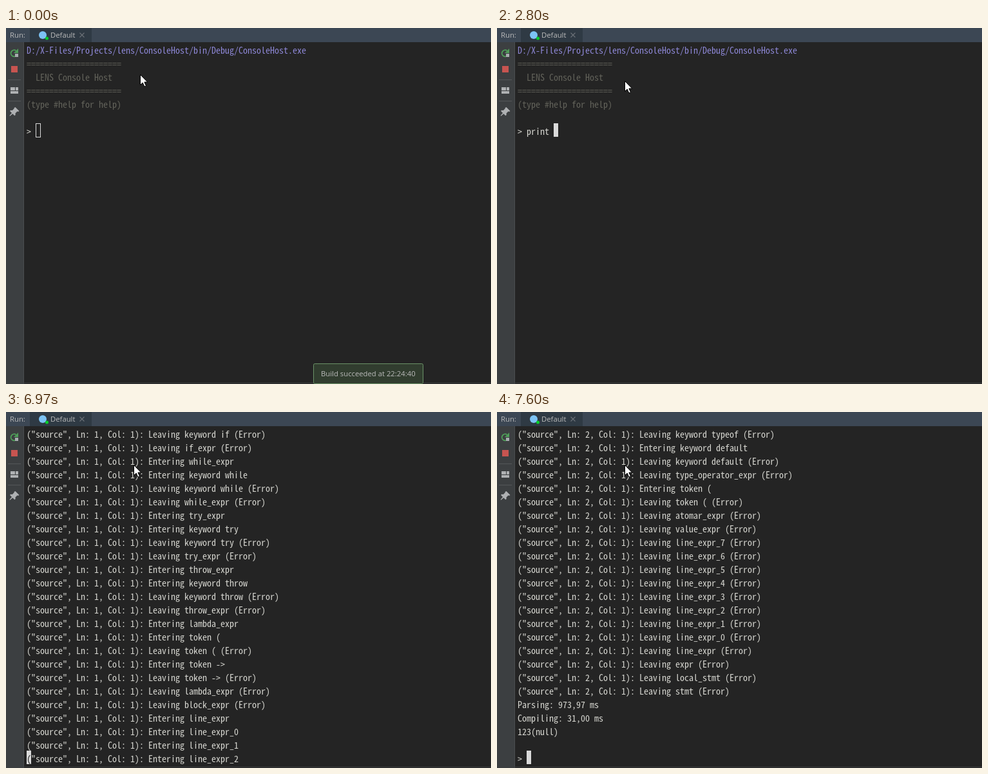
An HTML page with a canvas for the animation above (8 s loop, 753 px wide and 553 px high).

```html
<!DOCTYPE html>
<html>
<head>
<meta charset="utf-8">
<style>
html, body { margin: 0; width: 100%; height: 100%; overflow: hidden; background: #242424; }
canvas { display: block; }
</style>
</head>
<body>
<canvas id="stage" width="753" height="553"></canvas>
<script>
const ctx = document.getElementById('stage').getContext('2d', { alpha: false });
const LOOP = 8000, LEFT = 32, TOP = 22, CELL = 7, ROW = 21, ROWS = 25;
const TEXT = '#d6d6d0', BG = '#242424', BLOCK = '#dadada';
const UI = '11.3px "Open Sans", sans-serif';
const MONO = '"Noto Sans Mono CJK JP", "Noto Sans Mono CJK SC", "Noto Sans Mono", monospace';

// Pick the font size whose advance is one cell.
ctx.font = `14px ${MONO}`;
const mono = `${14 * CELL / ctx.measureText('M').width}px ${MONO}`;

// Trace shorthand: @line:col, + entering, - failed, = succeeded, ~ entered and failed.
function trace(script) {
  let at = '';
  return script.split('|').flatMap(item => {
    const name = item.slice(1);
    const enter = `("source", ${at}): Entering ${name}`;
    const leave = `("source", ${at}): Leaving ${name}`;
    switch (item[0]) {
      case '@': {
        const [line, col] = name.split(':');
        at = `Ln: ${line}, Col: ${col}`;
        return [];
      }
      case '+': return [enter];
      case '-': return [leave + ' (Error)'];
      case '=': return [leave + ' (Ok)'];
      case '~': return [enter, leave + ' (Error)'];
      default: return [item];
    }
  });
}
const tries = (kind, words) => words.split(' ').map(w => `~${kind} ${w}`).join('|');
const levels = (sign, list) => [...list].map(n => `${sign}line_expr_${n}`).join('|');
const skip = 'Inside skipNewlines with fresh = false';
const next = '+nextLine > checkIndent|=nextLine > checkIndent|' + skip;
const indent = '+ensureIndent 0|=ensureIndent 0|=indented line';
const definitions = '+using|~keyword using|-using|+record_def|~keyword record|-record_def|' +
  '+type_def|~keyword type|-type_def|+fun_def|~keyword pure|~keyword fun|-fun_def|+local_stmt|' +
  '+name_def_stmt|+var_stmt|~keyword var|-var_stmt|+let_stmt|~keyword let|-let_stmt|-name_def_stmt|' +
  '+assignment_stmt|~token ref|-assignment_stmt|+expr|+block_expr';
const values = '+value_expr|+atomar_expr|+literal|' +
  tries('keyword', 'null true false') + '|-literal|+type_operator_expr|' +
  tries('keyword', 'typeof default');

const parts = [
  `@1:1|+stmt|${definitions}|+if_expr|~keyword if|-if_expr|` +
  ['while', 'try', 'throw'].map(w => `+${w}_expr|~keyword ${w}|-${w}_expr`).join('|') +
  `|+lambda_expr|~token (|~token ->|-lambda_expr|-block_expr|+line_expr|${levels('+', '012')}`,

  `@1:1|${levels('+', '34567')}|${values}|-type_operator_expr|~token (|-atomar_expr|-value_expr|` +
  `${levels('-', '76543210')}|-line_expr|+invoke_expr|=identifier|@1:7|+value_expr|+literal|=literal|` +
  `=value_expr|@1:11|${tries('token', '[ . ** * / % + -')}|=line_expr_3|` +
  `${tries('token', '== <> < > <= >=')}|=line_expr_2|${tries('token', '&& || ^^'.replace('||', 'or'))}|` +
  `=line_expr_1|${tries('keyword', 'as is')}|=line_expr_0|+indented block|+indent level increase|` +
  `+indented line|${next}|@2:1|${indent}|-indent level increase|-indented block|@1:11|=line_expr|` +
  `=expr|=local_stmt|+indented line|${next}|@2:1|${indent}`,

  `@2:1|=stmt|+stmt|${definitions}|~keyword if|~keyword while|~keyword try|~keyword throw|-block_expr|` +
  `+line_expr|${levels('+', '01234567')}|${values}|-type_operator_expr|~token (|-atomar_expr|-value_expr|` +
  `${levels('-', '76543210')}|-line_expr|-expr|-local_stmt|-stmt|` +
  'Parsing: 973,97 ms|Compiling: 31,00 ms|123(null)| |> '
].map(trace);
const log = parts.flat();
const firstEnd = parts[0].length, secondEnd = firstEnd + parts[1].length;

const steps = [6890, 6970, 7030, 7100, 7170, 7240, 7300, 7370, 7440, 7520, 7600];
const typed = [[0, ''], [1950, 'p'], [2110, 'pr'], [2300, 'pri'], [2450, 'prin'], [2800, 'print '],
  [3360, 'print 1'], [3440, 'print 123'], [4100, 'print 123 '], [4560, 'print 123 #']];

function rect(x, y, w, h, color) {
  ctx.fillStyle = color;
  ctx.fillRect(x, y, w, h);
}
function label(text, x, y, color = '#bbbbbb') {
  ctx.font = UI;
  ctx.fillStyle = color;
  ctx.fillText(text, x, y);
}
function write(text, row, color = TEXT, col = 0) {
  ctx.font = mono;
  ctx.fillStyle = color;
  ctx.fillText(text, LEFT + col * CELL, TOP + 18 + row * ROW);
}
function stroke(path, color, width) {
  ctx.strokeStyle = color;
  ctx.lineWidth = width;
  ctx.stroke(new Path2D(path));
}
function fill(path, color) {
  ctx.fillStyle = color;
  ctx.fill(new Path2D(path));
}
function dot(x, y, r, color) {
  ctx.beginPath();
  ctx.arc(x, y, r, 0, 7);
  ctx.fillStyle = color;
  ctx.fill();
}
function block(col, row, char = '') {
  rect(LEFT + col * CELL, TOP + row * ROW, CELL, ROW, BLOCK);
  write(char, row, BG, col);
}

function drawWindow() {
  rect(0, 0, 753, 553, BG);
  rect(0, 0, 753, 22, '#3c4754');
  rect(37, 0, 96, 22, '#2f3a44');
  rect(0, 22, 28, 531, '#3c3f41');
  rect(27, 22, 1, 531, '#4b4d4f');
  rect(0, 551, 753, 1, '#3c3f41');
  label('Run:', 6, 15);
  dot(57, 11, 6, '#7cc3f4');
  dot(63.5, 16, 2.5, '#08d02c');
  label('Default', 69, 15);
  stroke('M114.5 7.5l7 7m0-7l-7 7', '#6c7278', 1.1);

  stroke('M16.5 42.5A5 5 0 1 1 15.5 35.2', '#4f9d59', 2);
  fill('M19 32v7h-7z', '#4f9d59');
  rect(14, 40, 5, 5, '#a9adb0');
  rect(8, 59, 10, 10, '#c75450');
  rect(3, 80, 20, 1, '#555759');
  rect(7, 92, 7, 5, '#afb1b3');
  rect(15, 92, 4, 5, '#afb1b3');
  rect(7, 98, 12, 4, '#afb1b3');
  rect(3, 113, 20, 1, '#555759');
  fill('M14.5 123l6 6-1.5 1-1.5-.5-3 3 .2 2.5-1.4 1.2-3-3-4 3.5-.8-.8 3.5-4-3-3 1.2-1.2 2.6.2 3-3-.3-1z', '#afb1b3');
}

function drawNotice(alpha) {
  if (alpha <= 0) return;
  ctx.globalAlpha = alpha;
  ctx.beginPath();
  ctx.roundRect(477.5, 521.5, 170, 31, 2);
  ctx.fillStyle = '#313d2f';
  ctx.fill();
  ctx.strokeStyle = '#6b9268';
  ctx.lineWidth = 1;
  ctx.stroke();
  label('Build succeeded at 22:24:40', 489, 541);
  ctx.globalAlpha = 1;
}

function drawPrompt(t) {
  write('D:/X-Files/Projects/lens/ConsoleHost/bin/Debug/ConsoleHost.exe', 0, '#8c86d4');
  ['='.repeat(21), '  LENS Console Host', '='.repeat(21), '(type #help for help)']
    .forEach((line, i) => write(line, i + 1, '#62625a'));
  const input = typed.findLast(([start]) => t >= start)[1];
  write('> ' + input, 6);
  if (t < 990) {
    ctx.strokeStyle = BLOCK;
    ctx.lineWidth = 1;
    ctx.strokeRect(46.5, 148.5, 7, 21);
  } else if (t >= 6610) {
    block(0, 8);
  } else if (!(t >= 3940 && t < 4100 || t >= 5560 && t < 6080)) {
    block(2 + input.length, 6);
  }
}

function drawLog(t) {
  const step = steps.findLastIndex(start => t >= start);
  const mix = (a, b, k) => Math.round(a + (b - a) * k);
  const end = step < 1 ? ROWS
    : step < 5 ? mix(firstEnd, secondEnd, (step - 1) / 4)
    : mix(secondEnd, log.length, (step - 5) / 5);
  const lines = log.slice(end - ROWS, end);
  lines.forEach((line, row) => write(line, row));
  const col = step === 10 ? 2 : step === 5 ? 25 : 0;
  block(col, ROWS - 1, lines[ROWS - 1][col]);
}

function drawPointer(t) {
  const k = t < 630 ? 0 : t < 690 ? 0.5 : 1;
  ctx.save();
  ctx.translate(208.5 - 10 * k, 72.5 + 10 * k);
  const arrow = 'M0 0V16L3.7 12.5L6.4 18.5L9 17.4L6.4 11.5H11.2Z';
  fill(arrow, '#fff');
  stroke(arrow, '#000', 1);
  ctx.restore();
}

function frame(now) {
  const t = now % LOOP;
  drawWindow();
  if (t < steps[0]) drawPrompt(t);
  else drawLog(t);
  drawNotice(t < 1950 ? 1 : 1 - (Math.floor((t - 1950) / 87.5) + 0.5) / 8);
  drawPointer(t);
  requestAnimationFrame(frame);
}
requestAnimationFrame(frame);
</script>
</body>
</html>
```
